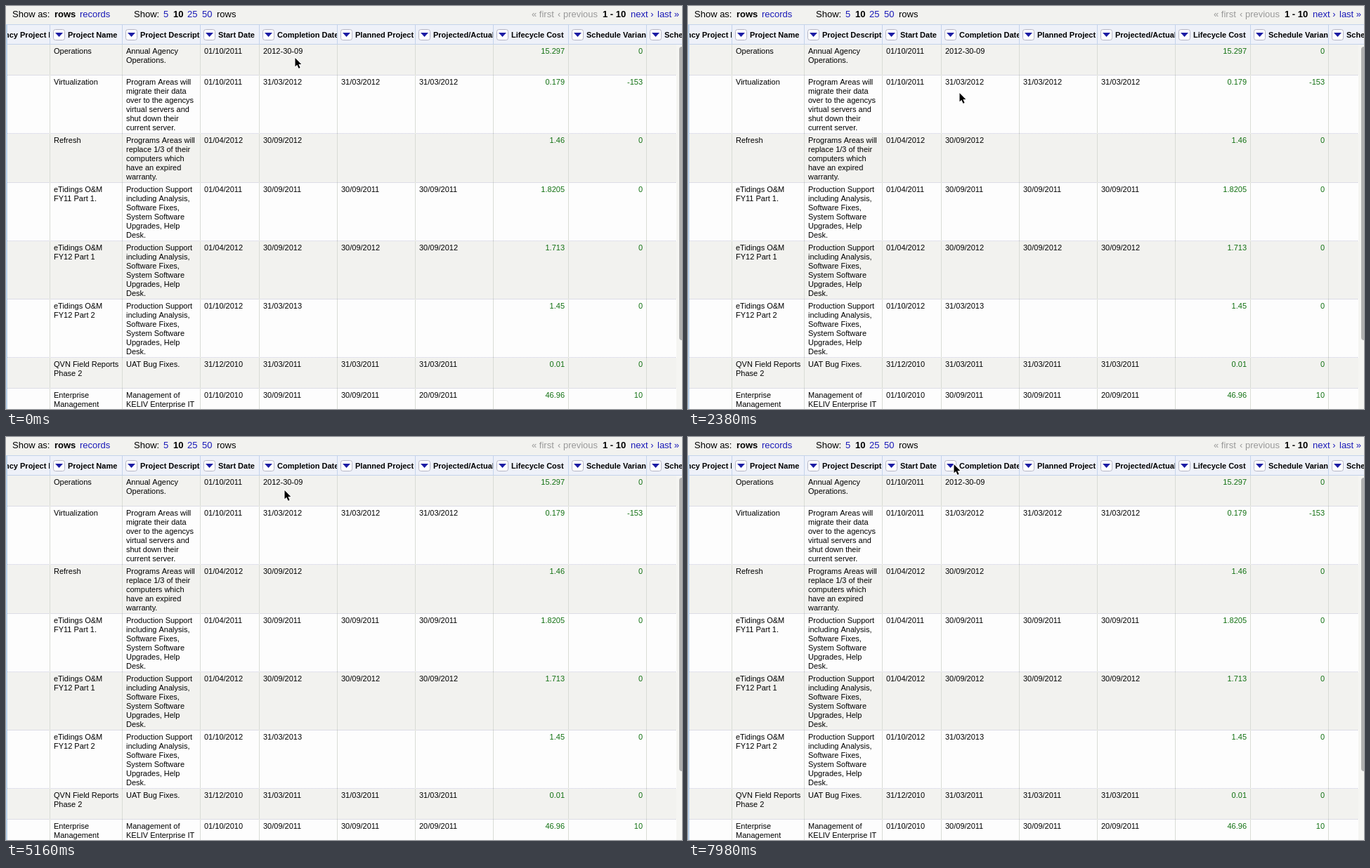
These frames come from a looping animation (962 by 574 pixels, 8000 ms). An HTML page with a canvas:

```html
<!DOCTYPE html>
<html lang="en">
<head>
<meta charset="utf-8">
<title>Project table</title>
<style>
  html, body { margin: 0; width: 100%; height: 100%; overflow: hidden; background: #f2f2ef; }
  canvas, svg { position: absolute; left: 0; top: 0; display: block; }
  svg { overflow: visible; }
</style>
</head>
<body>
<canvas id="table" width="962" height="574"></canvas>
<svg id="pointer" width="12" height="19">
  <path d="M0.5 1V13.2L3.3 10.7L5.5 15.8L7.6 14.9L5.4 9.9H9.3Z" fill="#000" stroke="#fff" stroke-width="1.8" paint-order="stroke"/>
</svg>
<script>
const LOOP = 8000;
const BAND = '#f2f2ef', LINK = '#1a1ab8', GRID = '#d9dcd6', HEADER_LINE = '#c4d3ea';
const edges = [2, 62, 165, 276, 360, 471, 582, 693, 800, 911, 962];
const headers = ['Project Name', 'Project Description', 'Start Date', 'Completion Date',
  'Planned Project Completion', 'Projected/Actual', 'Lifecycle Cost', 'Schedule Variance', 'Schedule'];

const support = 'Production Support\nincluding Analysis,\nSoftware Fixes,\nSystem Software\nUpgrades, Help\nDesk.';
// Each row: top edge, then the cells from "Project Name" on.
const rows = [
  [55, 'Operations', 'Annual Agency\nOperations.', '01/10/2011', '2012-30-09', '', '', '15.297', '0'],
  [99, 'Virtualization', 'Program Areas will\nmigrate their data\nover to the agencys\nvirtual servers and\nshut down their\ncurrent server.',
    '01/10/2011', '31/03/2012', '31/03/2012', '31/03/2012', '0.179', '-153'],
  [182, 'Refresh', 'Programs Areas will\nreplace 1/3 of their\ncomputers which\nhave an expired\nwarranty.',
    '01/04/2012', '30/09/2012', '', '', '1.46', '0'],
  [252, 'eTidings O&M\nFY11 Part 1.', support, '01/04/2011', '30/09/2011', '30/09/2011', '30/09/2011', '1.8205', '0'],
  [335, 'eTidings O&M\nFY12 Part 1', support, '01/04/2012', '30/09/2012', '30/09/2012', '30/09/2012', '1.713', '0'],
  [418, 'eTidings O&M\nFY12 Part 2', support, '01/10/2012', '31/03/2013', '', '', '1.45', '0'],
  [501, 'QVN Field Reports\nPhase 2', 'UAT Bug Fixes.', '31/12/2010', '31/03/2011', '31/03/2011', '31/03/2011', '0.01', '0'],
  [545, 'Enterprise\nManagement', 'Management of\nKELIV Enterprise IT', '01/10/2010', '30/09/2011', '30/09/2011', '20/09/2011', '46.96', '10'],
];

const ctx = document.getElementById('table').getContext('2d');

function rect(x, y, w, h, color) {
  ctx.fillStyle = color;
  ctx.fillRect(x, y, w, h);
}

function text(value, x, y, { size = 11, bold = false, color = '#000', align = 'left' } = {}) {
  ctx.font = `${bold ? 'bold ' : ''}${size}px "Liberation Sans", Arial, sans-serif`;
  ctx.fillStyle = color;
  ctx.textAlign = align;
  value.split('\n').forEach((line, i) => ctx.fillText(line, x, y + 13 * i));
}

function dottedRow(y) {
  ctx.strokeStyle = '#c6c6dc';
  ctx.setLineDash([1, 1]);
  ctx.beginPath();
  ctx.moveTo(2, y);
  ctx.lineTo(954, y);
  ctx.stroke();
  ctx.setLineDash([]);
}

function clipped(x, y, w, h, draw) {
  ctx.save();
  ctx.beginPath();
  ctx.rect(x, y, w, h);
  ctx.clip();
  draw();
  ctx.restore();
}

function drawToolbar() {
  rect(0, 0, 962, 26, BAND);
  const item = (value, x, color = '#000', bold = false) => text(value, x, 16, { size: 13, color, bold });
  item('Show as:', 9);
  item('rows', 69, '#000', true);
  item('records', 105, LINK);
  item('Show:', 182);
  item('5', 224, LINK);
  item('10', 238, '#000', true);
  item('25', 258, LINK);
  item('50', 279, LINK);
  item('rows', 300);
  item('« first', 748, '#999');
  item('‹ previous', 785, '#999');
  item('1 - 10', 849, '#000', true);
  item('next ›', 889, LINK);
  item('last »', 927, LINK);
}

function drawMenuButton(x) {
  ctx.beginPath();
  ctx.roundRect(x + 0.5, 33.5, 16, 15, 3);
  ctx.fillStyle = '#fff';
  ctx.fill();
  ctx.strokeStyle = '#b4b4c4';
  ctx.stroke();
  ctx.beginPath();
  ctx.moveTo(x + 3, 38);
  ctx.lineTo(x + 14, 38);
  ctx.lineTo(x + 8.5, 44);
  ctx.fillStyle = '#1c1ca4';
  ctx.fill();
}

function drawHeader() {
  rect(0, 26, 962, 29, '#eef1f9');
  rect(0, 26, 962, 1, HEADER_LINE);
  rect(0, 54, 962, 1, HEADER_LINE);
  clipped(2, 27, 60, 27, () => text('ncy Project ID', -2, 45, { bold: true }));
  headers.forEach((label, i) => {
    const left = edges[i + 1];
    rect(left, 27, 1, 27, HEADER_LINE);
    drawMenuButton(left + 5);
    clipped(left, 27, edges[i + 2] - left, 27, () => text(label, left + 26, 45, { bold: true }));
  });
}

function drawRows() {
  rows.forEach(([top, ...cells], r) => {
    const bottom = r + 1 < rows.length ? rows[r + 1][0] : 574;
    rect(2, top, 952, bottom - top, r % 2 ? '#fdfdfd' : BAND);
    if (r) dottedRow(top - 0.5);
    cells.forEach((value, c) => {
      const numeric = c > 5;
      text(value, numeric ? edges[c + 2] - 5 : edges[c + 1] + 6, top + 13,
        numeric ? { align: 'right', color: '#117011' } : {});
    });
  });
  edges.slice(1, -1).forEach(x => rect(x, 55, 1, 519, GRID));
}

function drawFrame() {
  rect(954, 55, 8, 519, '#f5f5f2');
  ctx.beginPath();
  ctx.roundRect(958, 58, 8, 418, 4);
  ctx.fillStyle = '#b0b0b0';
  ctx.fill();
  rect(0, 26, 2, 548, '#bdd4ec');
}

drawToolbar();
drawHeader();
drawRows();
drawFrame();

// Pointer tip: step, x, y.
const path = [[0, 411, 73], [20, 425, 85], [37, 400, 128], [65, 371, 118],
  [91, 419, 117], [125, 380, 45], [171, 378, 38], [172, 378, 38]];
const pointer = document.getElementById('pointer');

function stepAt(t) {
  const rest = t % 140;
  return 3 * Math.floor(t / 140) + (rest >= 20) + (rest >= 120);
}

function animate() {
  const step = stepAt(performance.now() % LOOP);
  const next = path.findIndex(([s]) => s > step);
  const [s0, x0, y0] = path[next - 1], [s1, x1, y1] = path[next];
  const k = (step - s0) / (s1 - s0);
  const eased = k * k * (3 - 2 * k);
  const x = Math.round(x0 + (x1 - x0) * eased), y = Math.round(y0 + (y1 - y0) * eased);
  pointer.style.transform = `translate(${x}px, ${y}px)`;
  requestAnimationFrame(animate);
}
animate();
</script>
</body>
</html>
```
